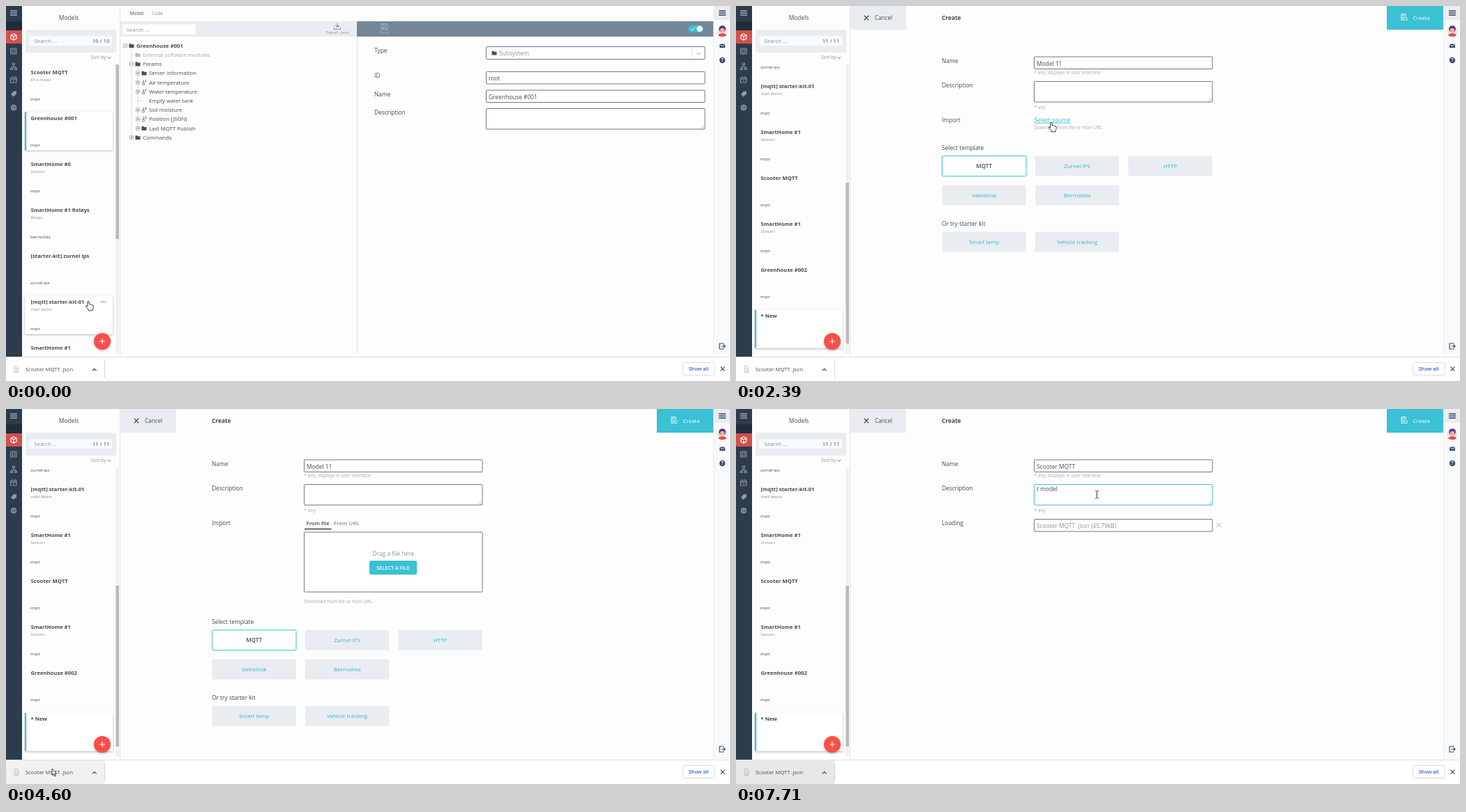
These frames come from a looping animation (1038x539 px, 8 s). An HTML page:

```html
<!DOCTYPE html>
<html lang="en">
<head>
<meta charset="utf-8">
<title>Model import</title>
<style>
  html, body { margin: 0; height: 100%; overflow: hidden; background: #fdfdfd; }
  svg { display: block; width: 100vw; height: 100vh; }
  text { font-family: "Open Sans", "Noto Sans", sans-serif; fill: #424b55; white-space: pre; }
  .bold { font-weight: 700; }
  .semi { font-weight: 600; }
  .ital { font-style: italic; }
  .mid { text-anchor: middle; }
  .grey { fill: #8b9095; }
  .pale { fill: #a5a9ad; }
  .cyan { fill: #35b5ca; }
  .white { fill: #fff; }
  .line { fill: none; stroke-linecap: round; stroke-linejoin: round; }
  .field { fill: #fff; stroke: #70777f; }
</style>
</head>
<body>
<svg id="stage" viewBox="0 0 1038 539" preserveAspectRatio="none"></svg>
<script>
const LOOP = 8000, STEP = 143, ROW = 66.1;
const CYAN = '#3bc0d4', PANEL = '#e9edf2';

// y is the middle of the capital letters
const text = (x, y, str, size = 8.4, cls = '', id = '') =>
  `<text x="${x}" y="${y + size * .36}" font-size="${size}" class="${cls}" id="${id}">${str}</text>`;
const rect = (x, y, w, h, fill, more = '') =>
  `<rect x="${x}" y="${y}" width="${w}" height="${h}" fill="${fill}" ${more}/>`;
const line = (d, color, width = 1, more = '') =>
  `<path class="line" d="${d}" stroke="${color}" stroke-width="${width}" ${more}/>`;
const field = (x, y, w, h, id = '') =>
  `<rect class="field" x="${x}" y="${y}" width="${w}" height="${h}" rx="1" id="${id}"/>`;
const group = (id, ...parts) => `<g id="${id}">${parts.join('')}</g>`;
const grip = (x, y) => line(`M${x - 5} ${y}l5-5M${x - 2} ${y}l2-2`, '#999', .6);
const cross = (x, y, r, color, width = 1) =>
  line(`M${x - r} ${y - r}l${2 * r} ${2 * r}m0 ${-2 * r}l${-2 * r} ${2 * r}`, color, width);
const burger = (x, y, color) => line(`M${x - 4.5} ${y - 3}h9m-9 3h9m-9 3h9`, color, 1.3);
const folder = (x, y, color = '#46505a') =>
  `<path d="M${x - 3.5} ${y - 2.8}h2.6l1 1h3.4v4.8h-7z" fill="${color}"/>`;

function leftBar() {
  const icon = (y, d) => line(`M11 ${y}${d}`, '#8f9ba7', 1);
  return rect(0, 0, 23, 505, '#2d3c4b') + rect(0, 22, 23, 13, '#202d39') +
    burger(11, 10, '#a3adb7') + rect(0, 35, 23, 19, '#d2504c') +
    line('M11 40l4 2v5l-4 2-4-2v-5zl0 0M7 42l4 2 4-2M11 44v5', '#fff', 1.1) +
    icon(65, 'm-4-4h8v8h-8zm2 2h4v4h-4z') +
    icon(86, 'm-1.5-4h3v2.5h-3zm1.5 2.5v3m-3 2v-2h6v2m-7.5 0h3v2h-3zm6 0h3v2h-3z') +
    icon(106, 'm-4-3h8v7h-8zm0 2h8m-6-3v-1m4 1v-1m-3 6h2') +
    `<path d="M7 127l4-4.500h4v4l-4.500 4z" fill="#8f9ba7"/>` +
    `<circle cx="11" cy="146" r="3.5" fill="none" stroke="#8f9ba7" stroke-width="1.500"/>` +
    icon(146, 'm-3-2l6 4m-6 0l6-4m-3-1.500v7');
}

function rightBar() {
  const ink = '#3c4c66';
  return rect(1015, 0, 23, 505, '#f8f9fa') + rect(1015, 0, 23, 20, PANEL) +
    line('M1014.5 0V504', '#eceef0') + burger(1027, 10, '#2c3c58') +
    `<circle cx="1027" cy="36" r="7.5" fill="#e6e4f2"/><circle cx="1027" cy="33" r="4.800" fill="#54318f"/>
     <path d="M1020.500 42q6.500-6 13 0-6.500 4.500-13 0z" fill="#e5533f"/><circle cx="1027" cy="35" r="3.200" fill="#f4b183"/>` +
    rect(1023, 54.500, 8, 5.500, ink, 'rx=".8"') + line('M1023.500 55.500l3.500 2.300 3.500-2.300', '#fff', .8) +
    `<circle cx="1027" cy="78" r="4.200" fill="${ink}"/>` + text(1027, 78, '?', 6.5, 'mid bold white') +
    line('M1029 485h-6v8h6M1026 489h5m-2-2l2 2-2 2', ink, 1.2);
}

function sidebar() {
  const models = [
    ['Scooter MQTT', 'First model', 'mqtt'], ['Greenhouse #001', '', 'mqtt'],
    ['SmartHome #0', 'Sensors', 'mqtt'], ['SmartHome #1 Relays', 'Relays', 'bermolida'],
    ['[starter-kit] zurnel ips', '', 'zurnel-ips'], ['[mqtt] starter-kit-01', 'mqtt device', 'mqtt'],
    ['SmartHome #1', 'Sensors', 'mqtt'], ['Scooter MQTT', '', 'mqtt'],
    ['SmartHome #1', 'Sensors', 'mqtt'], ['Greenhouse #002', '', 'mqtt'],
  ];
  const card = rect(27, 86, 126, 55, '#fff', 'filter="url(#shadow)"');
  const rows = models.map(([name, note, kind], i) => {
    const y = 95 + i * ROW;
    return text(35.5, y, name, 7.7, 'bold') + text(35.5, y + 10.5, note, 6, 'ital grey') +
      text(35, y + 38.5, kind, 6);
  });
  return rect(23, 0, 140, 505, '#fdfdfd') + line('M163.500 0V504', '#e3e5e8') +
    text(90, 17, 'Models', 8.4, 'mid') + rect(28, 34, 130, 33, PANEL, 'rx="2"') +
    rect(33, 43, 119, 14, '#f8fafb', 'rx="2"') + text(40.5, 50.5, 'Search ...', 7.8, 'grey') +
    text(148.5, 50.5, '', 7.8, '', 'count') + text(122, 74, 'Sort by', 6.6, 'grey') +
    line('M146 73.500l2 2 2-2', '#666') +
    `<g clip-path="url(#listArea)">` +
    group('list', group('selected', card, rect(27, 86, 2.2, 55, CYAN)),
      group('hovered', `<g transform="translate(0 ${5 * ROW})">${card}</g>`, text(135.5, 423, '...', 9, 'bold')),
      ...rows, group('newModel', text(35.5, 95 + 10 * ROW, '* New', 7.7, 'bold'))) + '</g>' +
    rect(157.5, 84, 4.5, 415, '#f0f0f0') + rect(157.5, 84, 4.5, 251, '#b9babb', 'id="thumb"') +
    `<circle id="fab" cx="138" cy="482" r="12" filter="url(#shadow)"/>` +
    line('M134.500 482h7m-3.500-3.500v7', '#fff', 1.1);
}

function modelView() {
  const tree = [
    [0, 'Greenhouse #001', 'folder', '-'], [1, 'External software modules', 'pale', ''],
    [1, 'Params', 'folder', '-'], [2, 'Server information', 'folder', '+'],
    [2, 'Air temperature', 'sensor', '+'], [2, 'Water temperature', 'sensor', '+'],
    [2, 'Empty water tank', '', ''], [2, 'Soil moisture', 'sensor', '+'],
    [2, 'Position (JSON)', 'sensor', '+'], [2, 'Last MQTT Publish', 'folder', '+'],
    [1, 'Commands', 'folder', '+'],
  ];
  const rows = tree.map(([level, label, icon, sign], i) => {
    const x = 171 + level * 9, y = 57 + i * 13.2;
    const mark = sign ? rect(x - 2.5, y - 2.5, 5, 5, '#fff', 'stroke="#aaa" stroke-width=".7"') +
      line(`M${x - 1.3} ${y}h2.600` + (sign === '+' ? 'm-1.300-1.300v2.600' : ''), '#666', .7) : '';
    const glyph = icon === 'sensor'
      ? line(`M${x + 8} ${y - 3}v4m2.500-4h1.500m-1.500 2h1.500`, '#777', 1.1) +
        `<circle cx="${x + 8}" cy="${y + 2}" r="1.700" fill="none" stroke="#777" stroke-width=".9"/>`
      : icon ? folder(x + 9, y, icon === 'pale' ? '#b5b9bd' : undefined) : '';
    return line(`M${x} ${y}h5`, '#bbb', .6, 'stroke-dasharray="1 1"') + mark + glyph +
      text(x + 16, y, label, 7.75, level ? (icon === 'pale' ? 'pale' : '') : 'bold');
  });
  const guides = line('M171 60V60M180 62V188M189 88V175', '#bbb', .6, 'stroke-dasharray="1 1"');
  const labels = [['Type', 64], ['ID', 100], ['Name', 126.5], ['Description', 153]];
  return group('modelView', rect(164, 0, 851, 504, '#fdfdfd'),
    text(177.5, 10.5, 'Model', 6.7), text(209, 10.5, 'Code', 6.7, 'grey'),
    rect(164, 22, 339, 22, PANEL), rect(503, 22, 512, 22, '#758697'),
    rect(167, 26.5, 105, 14, '#fff', 'rx="1.500"'), text(172.5, 34, 'Search ...', 7.8, 'grey'),
    line('M475 25v5m-2.500-2l2.500 2.500 2.500-2.500M470.500 31v2.500h9V31', '#8a929a', 1.1),
    text(475, 38, 'Export .json', 6, 'mid grey'),
    line('M538.500 25.500h7l1.500 1.500v6.500h-8.500zm2 0v2.500h4v-2.500m-4 8v-3h4.500v3', '#a9b4bf'),
    `<text x="542.500" y="40.200" font-size="6" class="mid" style="fill:#a9b4bf">Save</text>`,
    rect(978, 27.5, 22, 10.5, CYAN, 'rx="5.250"'), '<circle cx="994.500" cy="32.800" r="4.300" fill="#fff"/>',
    line('M982 33l2 2 3.500-4', '#fff'), line('M503.500 44V499', '#dcdfe2'), guides, ...rows,
    ...labels.map(([label, y]) => text(528, y, label)),
    field(688.5, 58.5, 313.5, 18), folder(700, 67.5), text(707, 68, 'Subsystem', 8.4, 'grey'),
    line('M983.500 62v11', '#ddd'), line('M990.500 67l2.500 2.500 2.500-2.500', '#999'),
    field(688.5, 94.5, 313.5, 17.5), text(692, 104, 'root'),
    field(688.5, 121, 313.5, 17.5), text(692, 130.5, 'Greenhouse #001'),
    field(688.5, 147.5, 313.5, 29.5), grip(1001, 176));
}

function createView() {
  const option = (col, y, label, chosen) => {
    const x = 295 + col * 133.4;
    return rect(x + .5, y + .5, 120.5, 29, chosen ? '#fff' : PANEL,
      `rx="1.500" ${chosen ? `stroke="${CYAN}"` : ''}`) +
      text(x + 60.7, y + 15, label, 8, chosen ? 'mid semi' : 'mid cyan');
  };
  return group('createView', rect(164, 0, 851, 504, '#fdfdfd'),
    rect(164, 0, 80, 34, PANEL), cross(187, 17, 2.8, '#222', 1.1), text(199, 17, 'Cancel', 8.1),
    text(295, 17, 'Create', 8.4, 'bold'), rect(933, 0, 82, 34, CYAN),
    line('M956 20.500h-2v-9h6v3m-4.500-1h3m-3 2.500h2m-2 2.500h1', '#fff', .9),
    '<circle cx="960" cy="18.500" r="2.300" fill="none" stroke="#fff" stroke-width=".9"/>',
    text(970.5, 17, 'Create', 8, 'white'),
    text(295, 79, 'Name'), field(427.5, 73, 255.5, 17.5), text(431, 82.5, '', 8.4, '', 'name'),
    text(427.5, 96, '* any, displays in user interface', 6.57, 'pale'),
    text(295, 114, 'Description'), field(427.5, 108.5, 255.5, 29.5, 'descField'), grip(682, 137),
    text(431, 115, '', 8.4, '', 'desc'), rect(431, 110.5, .7, 9, '#222', 'id="caret"'),
    text(427.5, 146, '* any', 6.57, 'pale'), text(295, 164, '', 8.4, '', 'importLabel'),
    group('sourceLink', text(427.5, 164, 'Select source', 8.4, 'cyan'),
      line('M428 168.300h51', CYAN, .8, 'id="underline"'),
      text(427.5, 174.5, 'Download from file or from URL', 6.57, 'pale')),
    group('dropPanel', text(430.5, 164.5, 'From file', 7.8, 'semi'), text(470, 164.5, 'From URL', 7.8, 'semi grey'),
      rect(428, 171.7, 38.5, 1.6, '#424b55'), field(427.5, 177, 255.5, 86, 'dropZone'),
      text(555.3, 208, 'Drag a file here', 8.4, 'mid grey', 'dropText'),
      group('selectFile', rect(521, 218, 68, 20, CYAN, 'rx="2"'), text(555, 228, 'SELECT A FILE', 7.3, 'mid semi white')),
      text(427.5, 276.5, 'Download from file or from URL', 6.57, 'pale')),
    group('templates', text(295, 204, 'Select template'),
      option(0, 215, 'MQTT', true), option(1, 215, 'Zurnel IPS'), option(2, 215, 'HTTP'),
      option(0, 257, 'Valirelosk'), option(1, 257, 'Bermolida'),
      text(295, 312.5, 'Or try starter kit'), option(0, 324, 'Smart lamp'), option(1, 324, 'Vehicle tracking')),
    group('loadedFile', field(427.5, 158.5, 255.5, 17.5),
      text(431, 167.5, 'Scooter MQTT .json (45.79kB)', 8.4, 'grey'), cross(692, 167, 3, '#aaa', .8)));
}

function downloadBar() {
  return rect(0, 504.5, 1038, 35, '#fff') + rect(0, 505, 141, 34, '#fff', 'id="download"') +
    line('M0 504.500H1038', '#dfe0e2') + line('M141.500 509V535', '#d5d7da') +
    line('M12.500 517.500h3.500l2 2v7h-5.500zm1.500 3.500h2.500m-2.500 2h2.500m-2.500 2h2.500', '#b5b8bb', .8) +
    text(28, 522.5, 'Scooter MQTT .json', 7.5) + line('M124 524l2.700-2.700 2.700 2.700', '#555', 1.1) +
    rect(970.5, 512.5, 45.5, 18, '#fff', 'rx="2" stroke="#dadce0"') +
    `<text x="993" y="524.200" font-size="7.200" class="mid semi" style="fill:#2a67d3">Show all</text>` +
    cross(1027.5, 521.5, 2.7, '#444', 1.1);
}

const cursors = group('cursor',
  `<path id="arrow" d="M0 0V9.500L2.200 7.500 3.800 11 5.300 10.300 3.800 7H6.800Z" fill="#fff" stroke="#111" stroke-width=".8"/>`,
  `<path id="hand" d="M-1.200.8Q0-.8 1.200.8V4.800Q2.300 3.800 3.200 5.200 4.300 4.400 5.200 5.800 7 5.200 7.200 7V9.500L6 12V13.800H0V12L-3.500 8.300Q-4 6.500-2.300 6.800L-1.200 8Z" fill="#fff" stroke="#222" stroke-width=".9"/>`,
  line('M-2-5.500q1.500 0 2 1 .5-1 2-1M0-4.500v9m-2 1q1.500 0 2-1 .5 1 2 1', '#222', .9, 'id="beam"'));

const stage = document.getElementById('stage');
stage.innerHTML = `<defs>
  <filter id="shadow" x="-20%" y="-20%" width="140%" height="150%">
    <feDropShadow dx="0" dy="1.200" stdDeviation="1.400" flood-color="#000" flood-opacity=".3"/></filter>
  <clipPath id="listArea"><rect x="23" y="84" width="134" height="415"/></clipPath></defs>` +
  modelView() + createView() + sidebar() + leftBar() + rightBar() + downloadBar() + cursors;

const ui = {};
stage.querySelectorAll('[id]').forEach(el => { if (el.id) ui[el.id] = el; });
ui.count.style.textAnchor = 'end';

// Each move starts at a time and holds every point for one step.
const moves = [
  [0, [[118, 424, 'hand']]],
  [150, [[140, 445, 'hand'], [188, 468], [160, 476], [133, 478, 'hand']]],
  [1490, [[160, 455], [220, 400], [290, 330], [355, 265], [410, 210], [440, 180], [452, 167, 'hand']]],
  [3300, [[508, 190], [455, 250], [340, 335], [230, 405], [145, 455], [105, 487], [75, 511], [62, 520]]],
  [4480, [[66, 517], [120, 478], [230, 400], [360, 310], [480, 250], [546, 223]]],
  [5810, [[528, 185], [516, 155], [516, 141], [517, 127, 'beam'], [517.5, 123, 'beam']]],
];

const show = (id, on) => { ui[id].style.display = on ? '' : 'none'; };
const shift = (id, y) => ui[id].setAttribute('transform', `translate(0 ${y})`);
const set = (id, attrs) => { for (const key in attrs) ui[id].setAttribute(key, attrs[key]); };
const between = (t, from, to) => t >= from && t < to;

function render(t) {
  const creating = t >= 880, loaded = t >= 5510;
  const open = between(t, 2670, 5510), dragging = between(t, 5050, 5510);

  show('modelView', !creating);
  show('createView', creating);
  show('newModel', creating);
  show('hovered', t < 290);
  shift('list', creating ? -310.5 : 0);
  shift('selected', (creating ? 10 : 1) * ROW);
  set('thumb', creating ? { y: 254, height: 231 } : { y: 84, height: 251 });
  ui.count.textContent = creating ? '11 / 11' : '10 / 10';
  set('fab', { fill: between(t, 580, 1490) ? '#fb2322' : '#fa504b' });

  show('sourceLink', creating && !open && !loaded);
  show('underline', t >= 2350);
  show('dropPanel', open);
  show('selectFile', !dragging);
  shift('dropText', dragging ? 12.5 : 0);
  ui.dropZone.style.stroke = dragging ? CYAN : '';
  ui.dropZone.style.strokeDasharray = dragging ? '2.5 1.5' : '';
  show('templates', !loaded);
  shift('templates', open ? 102.2 : 0);
  show('loadedFile', loaded);
  ui.importLabel.textContent = loaded ? 'Loading' : 'Import';
  ui.name.textContent = loaded ? 'Scooter MQTT' : 'Model 11';

  const erased = Math.max(0, Math.floor((t - 7020) / 138) - 1);
  ui.desc.textContent = loaded ? 'First model'.slice(Math.min(erased, 4)) : '';
  ui.descField.style.stroke = t >= 6380 ? CYAN : '';
  show('caret', between(t, 7020, 7290));
  set('download', { fill: loaded ? '#e8e8e8' : between(t, 4150, 4620) ? '#f1f1f1' : '#fff' });

  const [start, points] = moves.filter(move => move[0] <= t).pop();
  const [x, y, shape = 'arrow'] = points[Math.min(points.length - 1, Math.floor((t - start) / STEP))];
  set('cursor', { transform: `translate(${x} ${y})` });
  for (const id of ['arrow', 'hand', 'beam']) show(id, id === shape);
}

const begin = performance.now();
function tick() {
  render((performance.now() - begin) % LOOP);
  requestAnimationFrame(tick);
}
tick();
</script>
</body>
</html>
```
